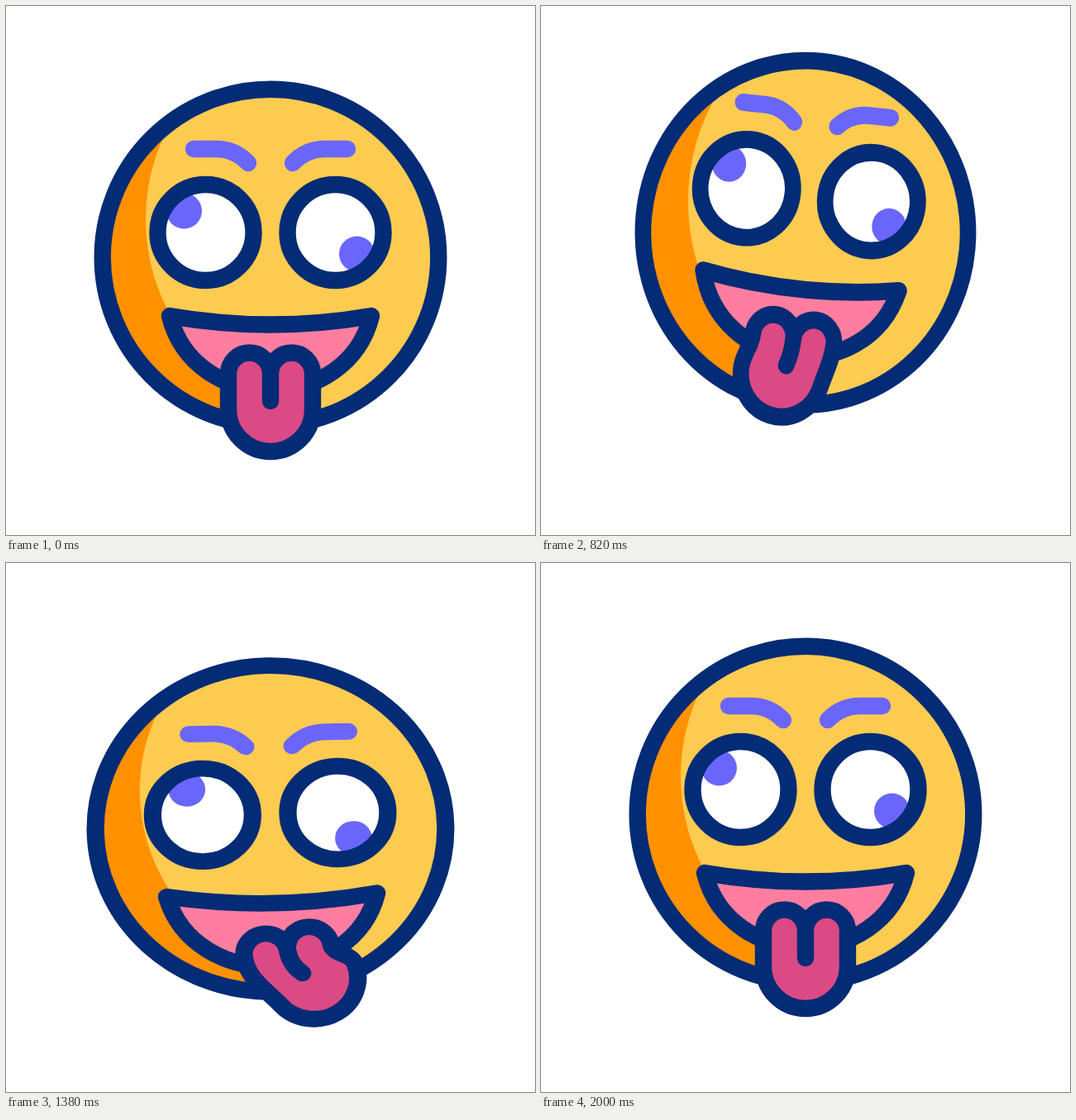
An HTML page that plays this animation: 640x640 px, repeating every 2.4 s.

```html
<!DOCTYPE html>
<html lang="en">
<head>
<meta charset="utf-8">
<title>Silly face</title>
<style>
  html, body { margin: 0; width: 100%; height: 100%; overflow: hidden; background: #fff; }
  svg { display: block; width: 100vw; height: 100vh; }
  .line, .brow { stroke: #042b75; stroke-width: 20.4; stroke-linecap: round; stroke-linejoin: round; }
  .brow { fill: none; stroke: #6b66fb; }
  .pupil { fill: #6b66fb; }
</style>
</head>
<body>
<svg viewBox="0 0 640 640">
  <defs>
    <clipPath id="inside"><circle r="200"/></clipPath>
    <clipPath id="eyeball"><circle r="54"/></clipPath>
  </defs>
  <g id="head">
    <circle r="203.3" fill="#ff9100"/>
    <circle cx="89" cy="-46" r="240" fill="#fdcb50" clip-path="url(#inside)"/>
    <circle r="203.3" fill="none" class="line"/>
    <g id="face">
      <path class="brow" d="M-93-131H-66Q-43-131-27-114"/>
      <path class="brow" d="M93-131H66Q43-131 27-114"/>
      <g transform="translate(-78.5 -30)">
        <circle r="58" fill="#fff"/>
        <g clip-path="url(#eyeball)"><circle id="pupilLeft" class="pupil" r="21.5"/></g>
        <circle r="58" fill="none" class="line"/>
      </g>
      <g transform="translate(78.5 -30)">
        <circle r="58" fill="#fff"/>
        <g clip-path="url(#eyeball)"><circle id="pupilRight" class="pupil" r="21.5"/></g>
        <circle r="58" fill="none" class="line"/>
      </g>
      <path id="mouth" class="line" fill="#ff7e9f"/>
      <path id="tongue" class="line" fill="#db4a85"/>
      <path id="groove" class="line" fill="none"/>
    </g>
  </g>
</svg>
<script>
const LOOP = 2400, STEP = 20, RAD = Math.PI / 180;
const el = id => document.getElementById(id);

// Turning points as [time, value], joined by a monotone cubic ease.
const bounce = [[210, 0], [370, 22], [580, -13], [960, -33.5], [1060, -32.5],
                [1310, 24], [1590, -17.5], [1860, 0]];
const sway = [[280, 0], [640, 7.5], [1280, -2], [1650, 3.2], [1950, 0]];
const roll = [[210, 225], [1450, 968], [1700, 912], [2000, 945]];
const grin = [[200, 1], [300, 1.038], [580, 0.967], [1060, 1.05], [1400, 1]];
const lick = [[280, 0], [600, -29], [1080, 31], [1380, 17], [2000, 0]];

function sample(keys, t) {
  const last = keys.length - 1;
  if (t <= keys[0][0]) return keys[0][1];
  if (t >= keys[last][0]) return keys[last][1];
  const i = keys.findIndex(k => k[0] > t) - 1;
  const secant = j => (keys[j + 1][1] - keys[j][1]) / (keys[j + 1][0] - keys[j][0]);
  const slope = j => {
    if (j === 0 || j === last) return 0;
    const a = secant(j - 1), b = secant(j);
    return a * b <= 0 ? 0 : 2 * a * b / (a + b);
  };
  const [t0, v0] = keys[i], [t1, v1] = keys[i + 1];
  const span = t1 - t0, u = (t - t0) / span, w = 1 - u;
  return v0 * w * w * (1 + 2 * u) + v1 * u * u * (3 - 2 * u)
    + span * u * w * (slope(i) * w - slope(i + 1) * u);
}

const along = (p, angle, d) => [p[0] + d * Math.sin(angle * RAD), p[1] + d * Math.cos(angle * RAD)];
const across = (p, angle, d) => along(p, angle + 90, d);
const xy = p => p.map(n => n.toFixed(2)).join(" ");
const arc = (r, p) => `A${r} ${r} 0 0 1 ${xy(p)}`;

// A side of the tongue, leaving p along angle a and reaching q from angle b.
function side(p, a, q, b) {
  const k = 0.38 * Math.hypot(q[0] - p[0], q[1] - p[1]);
  return `C${xy(along(p, a, k))} ${xy(along(q, b, k))} ${xy(q)}`;
}

function drawTongue(slide) {
  const R = 51, lobe = R / 2;
  const root = slide / 2, bend = 42 * Math.tanh(slide / 8);
  // The inside of the bend turns only half as far as the outside.
  const leftTurn = bend > 0 ? bend : bend / 2, rightTurn = bend > 0 ? bend / 2 : bend;
  const top = [slide, 141], tip = along(top, bend, 43 + Math.abs(bend) * 0.07);
  const topLeft = across(top, root, -R), topRight = across(top, root, R);
  const tipLeft = across(tip, leftTurn, -R), tipRight = across(tip, rightTurn, R);
  el("tongue").setAttribute("d", `M${xy(topLeft)}${arc(lobe, top)}${arc(lobe, topRight)}`
    + side(topRight, root, tipRight, rightTurn + 180) + arc(R, tipLeft)
    + side(tipLeft, leftTurn + 180, topLeft, root) + "Z");
  el("groove").setAttribute("d",
    `M${xy(top)}Q${xy(along(top, root, 18))} ${xy(along(top, bend * 0.75, 33))}`);
}

function drawMouth(smile) {
  const c = 122 * smile, k = 92 * smile;
  el("mouth").setAttribute("d", `M${-c} 71Q0 92 ${c} 71C${k} 191 ${-k} 191 ${-c} 71Z`);
  el("mouth").setAttribute("transform", `translate(0 ${55 * (smile - 1)})`);
}

function placePupil(id, angle) {
  el(id).setAttribute("cx", 36.8 * Math.cos(angle * RAD));
  el(id).setAttribute("cy", 36.8 * Math.sin(angle * RAD));
}

function render(time) {
  const t = Math.floor((time % LOOP) / STEP) * STEP;
  const lift = sample(bounce, t), gaze = sample(roll, t);
  // Squash and stretch trail the bounce a little.
  const push = sample(bounce, t - 55);
  const squash = push * Math.abs(push) * (push > 0 ? 7.5e-5 : 4.6e-5);
  el("head").setAttribute("transform", `translate(320 ${304 + lift}) `
    + `scale(${1 + squash} ${1 - 0.7 * squash}) rotate(${sample(sway, t)})`);
  el("face").setAttribute("transform", `translate(0 ${lift * (lift > 0 ? 0.65 : 0.49)})`);
  placePupil("pupilLeft", gaze);
  placePupil("pupilRight", gaze + 180);
  drawMouth(sample(grin, t));
  drawTongue(sample(lick, t));
}

const start = performance.now();
function tick() {
  render(performance.now() - start);
  requestAnimationFrame(tick);
}
tick();
</script>
</body>
</html>
```
